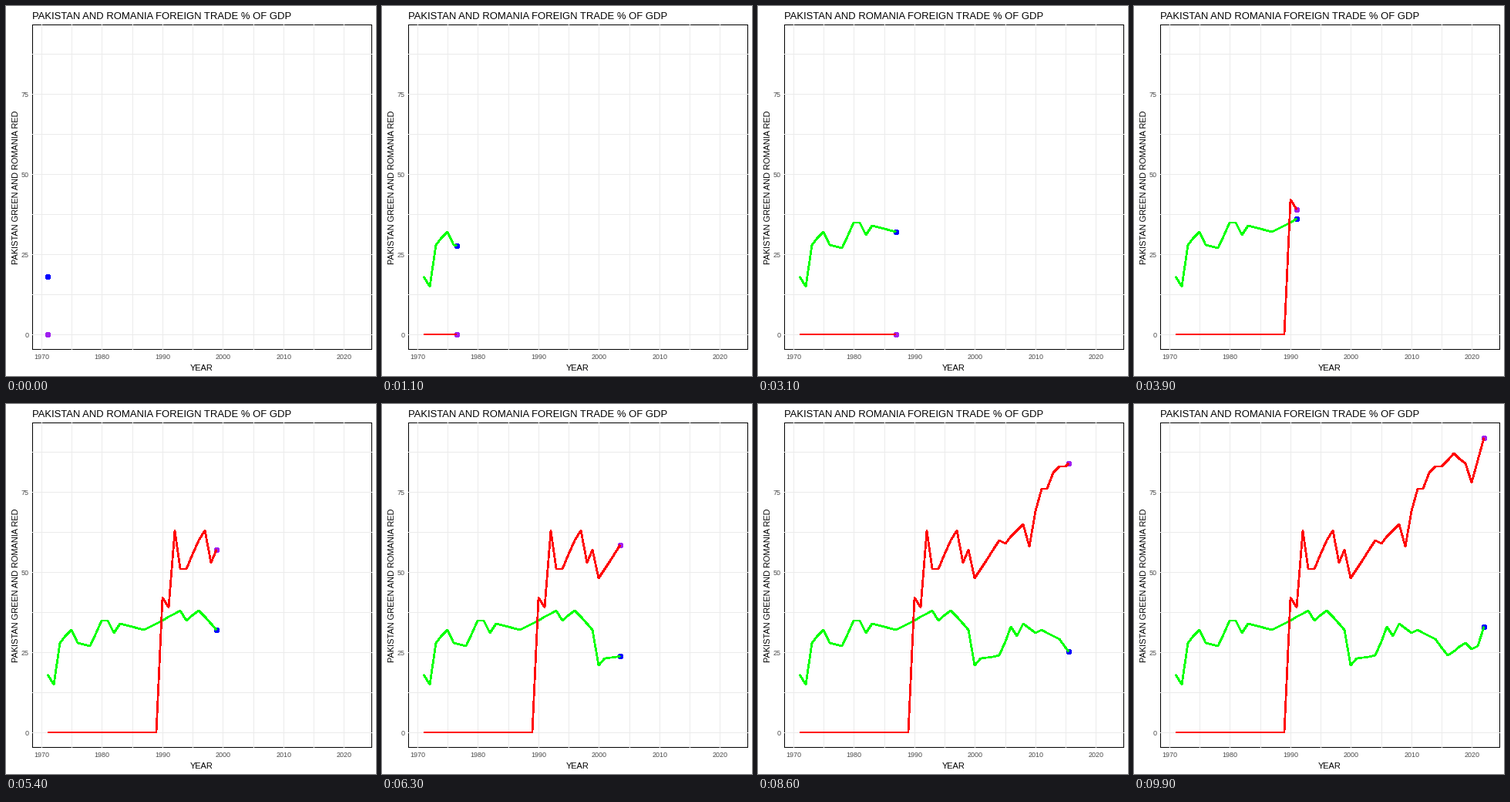
A matplotlib script that plays this animation: 480x480 px, repeating every 10000 ms.

```python
import numpy as np
import matplotlib.pyplot as plt
from matplotlib.animation import FuncAnimation
from matplotlib.patches import Circle, Rectangle

plt.rcParams["font.family"] = "Liberation Sans"

SIZE, DPI = 480, 72
FRAMES, INTERVAL = 100, 100
LEFT, RIGHT, TOP, BOTTOM = 34, 474, 24, 445
START, END = 1971, 2022

# Turning points of each curve; the years between lie on straight lines.
PAKISTAN = {1971: 18, 1972: 15, 1973: 28, 1975: 32, 1976: 28, 1978: 27,
            1980: 35, 1981: 35, 1982: 31, 1983: 34, 1987: 32, 1993: 38,
            1994: 35, 1996: 38, 1999: 32, 2000: 21, 2001: 23, 2004: 24,
            2006: 33, 2007: 30, 2008: 34, 2010: 31, 2011: 32, 2014: 29,
            2016: 24, 2019: 28, 2020: 26, 2021: 27, 2022: 33}
ROMANIA = {1971: 0, 1989: 0, 1990: 42, 1991: 39, 1992: 63, 1993: 51,
           1994: 51, 1996: 60, 1997: 63, 1998: 53, 1999: 57, 2000: 48,
           2004: 60, 2005: 59, 2008: 65, 2009: 58, 2010: 69, 2011: 76,
           2012: 76, 2013: 81, 2014: 83, 2015: 83, 2017: 87, 2019: 84,
           2020: 78, 2022: 92}

# Each year lands on a whole frame; positions in between are interpolated.
years = np.arange(START, END + 1)
arrival = np.round((years - START) * (FRAMES - 1) / (END - START))


def px(year):
    return np.floor(46.5 + (np.asarray(year) - 1970) * 7.843)


def py(value):
    return np.floor(426.5 - np.asarray(value) * 4.157)


fig = plt.figure(figsize=(SIZE / DPI, SIZE / DPI), dpi=DPI, facecolor="white")
ax = fig.add_axes([0, 0, 1, 1])
ax.set(xlim=(0, SIZE), ylim=(SIZE, 0))
ax.axis("off")

ax.add_patch(Rectangle((LEFT + 0.5, TOP + 0.5), RIGHT - LEFT, BOTTOM - TOP,
                       fc="white", ec="black", lw=1, aa=False, snap=False,
                       zorder=0))


def grid(xs, ys):
    ax.plot(xs, ys, color="#EBEBEB", lw=1, aa=False, snap=False, zorder=1,
            solid_capstyle="butt")


def label(x, y, text, size=11, color="black", **align):
    ax.text(x, y, text, size=size, color=color, **align)


for year in range(1970, 2021, 5):
    x = px(year) + 0.5
    grid([x, x], [TOP, BOTTOM + 1])
    if year % 10 == 0:
        label(x, 458.5, str(year), 9, "#4D4D4D", ha="center")
for value in np.arange(0, 88, 12.5):
    y = py(value) + 0.5
    grid([LEFT, RIGHT + 1], [y, y])
    if value % 25 == 0:
        label(29.3, y + 3.5, f"{value:.0f}", 9, "#4D4D4D", ha="right")

label(34, 17, "PAKISTAN AND ROMANIA FOREIGN TRADE % OF GDP", 13)
label(254, 473, "YEAR", ha="center")
label(13.5, 235.5, "PAKISTAN GREEN AND ROMANIA RED", rotation=90,
      ha="center", va="center")


def series(points, line_color, dot_color):
    values = np.interp(years, list(points), list(points.values()))
    dot = ax.add_patch(Circle((0, 0), 3.5, color=dot_color, lw=0, aa=False,
                              zorder=3))
    line, = ax.plot([], [], color=line_color, lw=1.7, aa=False, snap=False,
                    zorder=4, solid_capstyle="butt", solid_joinstyle="round")
    return values, line, dot


tracks = [series(PAKISTAN, "#00FF00", "#0000FF"),
          series(ROMANIA, "#FF0000", "#A020F0")]


def update(frame):
    artists = []
    now = np.interp(frame, arrival, years)
    past = arrival < frame
    for values, line, dot in tracks:
        level = np.interp(now, years, values)
        line.set_data(px(np.append(years[past], now)),
                      py(np.append(values[past], level)))
        dot.center = px(now) + 0.5, py(level) + 0.5
        artists += [line, dot]
    return artists


anim = FuncAnimation(fig, update, frames=FRAMES, interval=INTERVAL,
                     repeat=True, repeat_delay=0)
plt.show()
```
